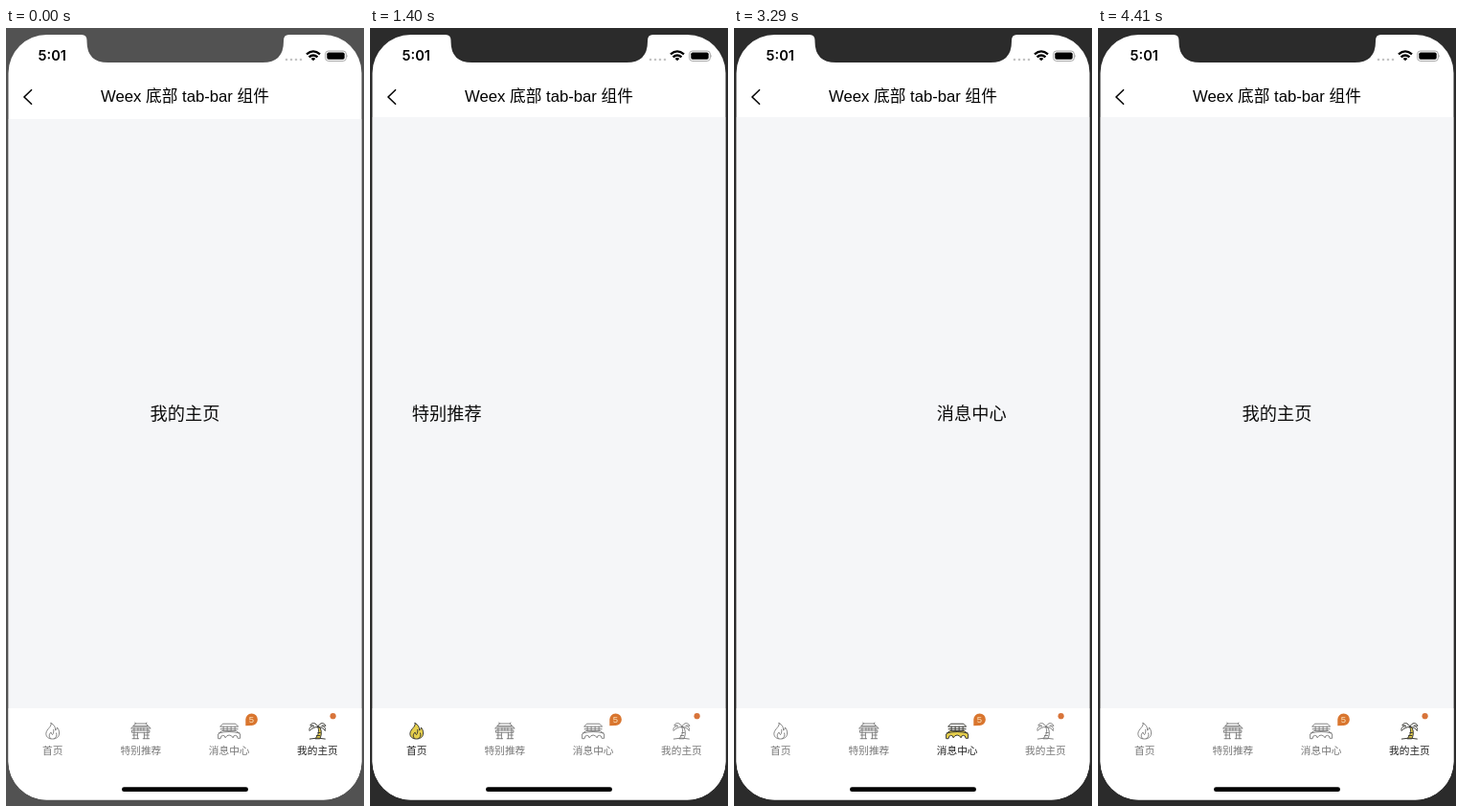
Recreate the animation shown at these times as an HTML page. Size 374 by 812 pixels, loop 4760 ms.

```html
<!DOCTYPE html>
<html lang="zh-CN">
<head>
<meta charset="utf-8">
<title>tab-bar</title>
<style>
html, body { margin: 0; width: 100%; height: 100%; overflow: hidden; background: #525252; }
svg { display: block; width: 374px; height: 812px; }
text { font-family: "Liberation Sans", "Noto Sans CJK SC", "Noto Sans CJK", sans-serif; text-anchor: middle; }
.page { font-size: 18.2px; fill: #0c0c0c; }
.tab { fill: none; stroke: #707070; stroke-width: .85; stroke-linejoin: round; stroke-linecap: round; }
.tab text { font-size: 10.7px; fill: #777; stroke: none; }
.tab.on { stroke: #3b3b36; stroke-width: 1; }
.tab.on text { fill: #222; font-weight: 500; }
.tab.on .tint { fill: #e6cf4c; }
</style>
</head>
<body>
<svg viewBox="0 0 374 812">
  <defs>
    <clipPath id="screen"><rect x="2.5" y="7" width="369" height="798.5" rx="40"/></clipPath>
  </defs>
  <rect class="bezel" width="374" height="812"/>
  <g clip-path="url(#screen)">
    <rect width="374" height="812" fill="#fff"/>
    <rect id="content" x="2.5" width="369" fill="#f5f6f8"/>
    <g id="strip"></g>
    <rect x="0" y="710" width="374" height="102" fill="#fff"/>
    <g id="tabs"></g>
    <path d="M250.3 728.3V721.5a6.3 6.3 0 1 1 6.3 6.5Z" fill="#d9762f"/>
    <text x="256.5" y="725.2" font-size="9.5" fill="#fbe3bd">5</text>
    <circle cx="341.6" cy="718.2" r="3.1" fill="#d8743a"/>
    <rect x="121" y="792.3" width="132" height="4.8" rx="2.4" fill="#000"/>
    <path class="bezel" d="M76 0V7h3q5.5 0 5.5 6v1q0 22 22 22h161.500q22 0 22-22v-1q0-6 5.500-6h3V0Z"/>
    <text x="48.3" y="34.3" style="font:600 14.6px Inter,'Liberation Sans',sans-serif">5:01</text>
    <g fill="#c4c4c4" id="dots"></g>
    <g fill="none" stroke="#000" stroke-width="2.3">
      <path d="M314 27.400q7-6 14 0M316.500 30.300q4.500-3.700 9 0"/>
      <path d="M321 34.300l-2.400-2.300q2.400-1.900 4.800 0z" fill="#000" stroke="none"/>
    </g>
    <rect x="333.700" y="24" width="21.600" height="10.400" rx="3" fill="none" stroke="#a4a4a4"/>
    <rect x="335.300" y="25.600" width="18.400" height="7.200" rx="1.700"/>
    <path d="M356.300 27.500q1.600 1.700 0 3.400z" fill="#a4a4a4"/>
    <path d="M27 64.300L19 72l8 7.700" fill="none" stroke="#000" stroke-width="1.500"/>
    <text x="187" y="77" font-size="16.700">Weex 底部 tab-bar 组件</text>
  </g>
</svg>
<script>
const LOOP = 4760, STEP = 70, SLIDE = 270, WIDTH = 369;
const START_TAB = 3;
const TAPS = [[1307, 0], [2186, 1], [3130, 2], [3905, 3]];

// Icons are drawn around the centre of each tab
const TABS = [
  ['首页', `
    <path class="tint" d="M-1.500-8c1 4-5 6-5.300 11c0 3.500 2.800 5.500 6.800 5.500s7-2.300 7-6c0-2.500-1-4.500-2.200-6c-.2 1.700-.8 2.500-1.800 3c.2-3-1.500-6.200-4.500-7.500z"/>
    <path d="M-2 8c-2.500-2-1.500-5 .5-6.500c0 1.500.5 2 1.500 2.500c1-1.500 1.500-3 1-5M2 8c2-1.200 2.800-3 2-5.500"/>`],
  ['特别推荐', `
    <path class="tint" d="M-5.500-7.500h11l2 2.800h-15zM-10-2.800l2-1.900h16l2 1.900zM-9-.5h18v2.300h-18z"/>
    <path d="M-7-2.800v11M-3.500 1.800v6.400M3.500 1.800v6.400M7-2.800v11M-3-2.800v2.300M0-2.800v2.300M3-2.800v2.300M-8.800 8.200h6.500M2.300 8.200h6.500M-8.500 4.500h5M3.500 4.500h5M-6-8.500l.5 1M6-8.500l-.5 1"/>`],
  ['消息中心', `
    <path d="M-7-7l-2.500 2.700h19L7-7zM-6-4.300v3.800M-2-4.300v3.800M2-4.300v3.800M6-4.300v3.800M-9-1.800h18"/>
    <path class="tint" d="M-11.500 7.800V3.500l4-3.500h15l4 3.500v4.300H9q-.3-3-2.500-3T4 7.300q-1.500-2.800-4-2.800T-4 7.300q-.3-2.500-2.500-2.500T-9 7.800z"/>
    <path d="M-11 2.500q11-3 22 0"/>`],
  ['我的主页', `
    <path d="M.5-4c-1.500-5-7-5-8-1.500c2-.5 3.200 0 4 .8c-3-.7-5.700 1.700-4.700 4.700c2-2.500 5-4 8.700-4c3.500 0 6 1.500 7.500 4c1-3-1.200-5-3.700-4.900c.8-.7 2.200-.8 4.200-.1c-.8-3.800-6.300-4.300-8 1z"/>
    <path class="tint" d="M.5-3.500c1.800 4 .5 8-3 11.800h5c2-4 2-8 .2-11.500z"/>
    <path d="M-8 8.500q8-2 16 0M.5 2h2.500M-.8 5h3.300"/>`]
];

const $ = id => document.getElementById(id);
const tabX = i => 2.5 + WIDTH / 4 * (i + .5);

$('strip').innerHTML = TABS.map(([name], i) =>
  `<text class="page" x="${187 + WIDTH * i}" y="408.600">${name}</text>`).join('');
$('tabs').innerHTML = TABS.map(([name, icon], i) =>
  `<g class="tab" transform="translate(${tabX(i)} 733.500)">${icon}<text y="24.300">${name}</text></g>`).join('');
$('dots').innerHTML = [293, 298, 303, 308].map(x =>
  `<circle cx="${x}" cy="33" r="1.300"/>`).join('');

const tabs = [...document.querySelectorAll('.tab')];
const bezels = document.querySelectorAll('.bezel');
const easeOut = k => 1 - (1 - k) ** 2;

function render(time) {
  const t = Math.floor(time % LOOP / STEP) * STEP;
  let active = START_TAB, position = START_TAB;
  for (const [start, tab] of TAPS) {
    if (t < start) break;
    position = active + (tab - active) * easeOut(Math.min(1, (t - start) / SLIDE));
    active = tab;
  }
  $('strip').setAttribute('transform', `translate(${-position * WIDTH} 0)`);
  tabs.forEach((el, i) => el.classList.toggle('on', i === active));

  const top = t < 140 ? 95 : 93;
  $('content').setAttribute('y', top);
  $('content').setAttribute('height', 710 - top);
  bezels.forEach(el => el.setAttribute('fill', t < 1260 ? '#525252' : '#2b2b2b'));
}

const begin = performance.now();
function tick() {
  render(performance.now() - begin);
  requestAnimationFrame(tick);
}
tick();
</script>
</body>
</html>
```
